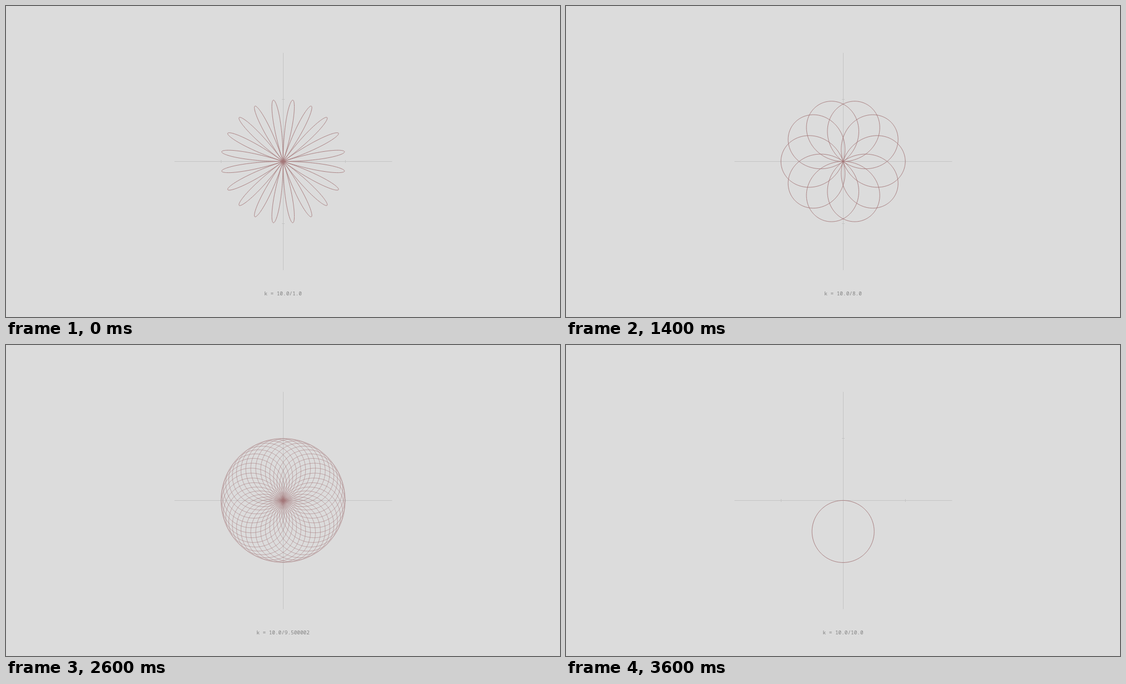
An HTML page with a canvas that plays this animation: 998 px wide and 561 px high, repeating every 3800 ms.

```html
<!DOCTYPE html>
<html>
<head>
<meta charset="utf-8">
<style>
  html, body { margin: 0; width: 100%; height: 100%; overflow: hidden; background: #dcdcdc; }
  canvas { display: block; }
</style>
</head>
<body>
<canvas id="stage" width="998" height="561"></canvas>
<script>
const ctx = document.getElementById('stage').getContext('2d');
const STEP_MS = 200, CX = 499.2, CY = 280.4, RADIUS = 112, AXIS = 196, TICK = 2.5, NUMERATOR = 10;
const HALF_TURNS = 190, PASS_ALPHA = 0.17;

// Whole denominators 1..9, then tenths accumulated in single precision up to 10.
const denominators = [1, 2, 3, 4, 5, 6, 7, 8, 9];
while (denominators.at(-1) < 10) {
  const next = Math.fround(denominators.at(-1) + Math.fround(0.1));
  denominators.push(Math.min(next, 10));
}

const formatFloat = value => value.toFixed(6).replace(/(\.\d+?)0+$/, '$1');
const gcd = (a, b) => b ? gcd(b, a % b) : a;

function drawAxes() {
  const x = 499.5, y = 280.5;
  const line = (x1, y1, x2, y2) => {
    ctx.moveTo(x + x1, y + y1);
    ctx.lineTo(x + x2, y + y2);
  };
  ctx.beginPath();
  line(-AXIS, 0, AXIS, 0);
  line(0, -AXIS, 0, AXIS);
  for (const at of [-RADIUS, RADIUS]) {
    line(at, -TICK, at, TICK);
    line(-TICK, at, TICK, at);
  }
  ctx.lineWidth = 1;
  ctx.strokeStyle = '#c4c4c4';
  ctx.stroke();
}

// Half turns after which r = sin(p/q * angle) closes.
function closingHalfTurns(denominator) {
  const tenths = Math.round(denominator * 10);
  const divisor = gcd(NUMERATOR * 10, tenths);
  const p = NUMERATOR * 10 / divisor, q = tenths / divisor;
  return p * q % 2 ? q : 2 * q;
}

function drawRose(denominator) {
  const k = NUMERATOR / denominator;
  const halfTurns = closingHalfTurns(denominator);
  const segments = Math.ceil(120 * Math.max(1, k));
  ctx.lineWidth = 0.9;
  ctx.strokeStyle = 'rgb(164, 120, 121)';
  // A curve that closes sooner is retraced more often and looks more solid.
  ctx.globalAlpha = 1 - (1 - PASS_ALPHA) ** (HALF_TURNS / halfTurns);
  for (let turn = 0; turn < halfTurns; turn++) {
    ctx.beginPath();
    for (let i = 0; i <= segments; i++) {
      const angle = (turn + i / segments) * Math.PI;
      const r = RADIUS * Math.sin(k * angle);
      ctx.lineTo(CX + r * Math.cos(angle), CY + r * Math.sin(angle));
    }
    ctx.stroke();
  }
  ctx.globalAlpha = 1;
}

function drawLabel(denominator) {
  ctx.font = '9.4px "Noto Sans Mono", monospace';
  ctx.textAlign = 'center';
  ctx.fillStyle = '#828282';
  ctx.fillText(`k = ${formatFloat(NUMERATOR)}/${formatFloat(denominator)}`, 499, 522);
}

function draw(denominator) {
  ctx.fillStyle = '#dcdcdc';
  ctx.fillRect(0, 0, 998, 561);
  drawAxes();
  drawRose(denominator);
  drawLabel(denominator);
}

let shown = -1;
function tick() {
  const step = Math.floor(performance.now() / STEP_MS) % denominators.length;
  if (step !== shown) draw(denominators[shown = step]);
  requestAnimationFrame(tick);
}
tick();
</script>
</body>
</html>
```
